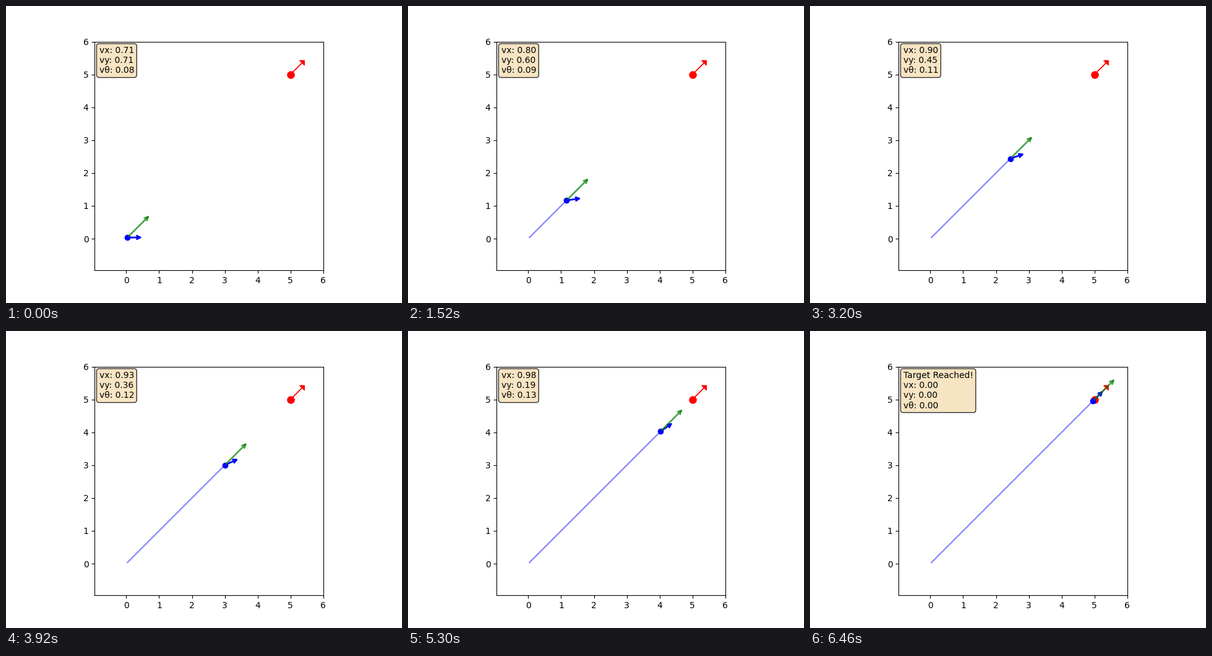
These frames come from a looping animation (640 px wide and 480 px high, 6.48 s). A matplotlib script:

```python
import numpy as np
import matplotlib.pyplot as plt
from matplotlib.animation import FuncAnimation

DT = 0.05
GOAL = np.array([5.0, 5.0])
GOAL_HEADING = np.pi / 4
TICK = 20        # ms
TICKS = 324


def simulate():
    """Drive sideways-capable robot to the goal while turning to its heading."""
    pos, heading = np.zeros(2), 0.0
    states = []
    while True:
        gap = GOAL - pos
        dist = np.hypot(*gap)
        bearing = np.arctan2(gap[1], gap[0]) - heading
        vx, vy = np.cos(bearing), np.sin(bearing)
        spin = (GOAL_HEADING - heading) * vx / dist
        pos = pos + gap / dist * DT
        heading += spin * DT
        done = np.hypot(*(GOAL - pos)) < 0.1
        if done:
            vx = vy = spin = 0.0
        label = f"vx: {vx:.2f}\nvy: {vy:.2f}\nvθ: {spin:.2f}"
        if done:
            label = "Target Reached!\n" + label
        states.append((pos, heading, label))
        if done:
            return states


states = simulate()
path = np.array([s[0] for s in states])

fig, ax = plt.subplots(figsize=(6.4, 4.8), dpi=100)
ax.set_aspect("equal")
ax.set_xlim(path[0, 0] - 1, GOAL[0] + 1)
ax.set_ylim(path[0, 1] - 1, GOAL[1] + 1)


def vector(angle, length):
    return length * np.array([np.cos(angle), np.sin(angle)])


def pointer(color, alpha=1):
    return ax.annotate("", xy=(0, 0), xytext=(0, 0),
                       arrowprops=dict(arrowstyle="->", color=color,
                                       lw=2, alpha=alpha))


def aim(arrow, start, angle, length):
    arrow.set_position(start)
    arrow.xy = start + vector(angle, length)


ax.plot(*GOAL, "ro", markersize=8)
ax.arrow(*GOAL, *vector(GOAL_HEADING, 0.5), head_width=0.2, head_length=0.1,
         fc="red", ec="red")
trail, = ax.plot([], [], "b-", alpha=0.5)
robot, = ax.plot([], [], "bo", markersize=6)
nose = pointer("blue")
course = pointer("green", 0.7)
info = ax.text(0.02, 0.98, "", transform=ax.transAxes, va="top",
               bbox=dict(boxstyle="round", facecolor="wheat", alpha=0.8))


def step_at(tick):
    # Steps last 20, 20 and 100 ms in turn.
    group, rest = divmod(tick + 1, 7)
    return min(3 * group + min(rest, 2) - 1, len(states) - 1)


def update(tick):
    i = step_at(tick)
    pos, heading, label = states[i]
    trail.set_data(path[:i + 1, 0], path[:i + 1, 1])
    robot.set_data(pos[:1], pos[1:])
    gap = GOAL - pos
    aim(nose, pos, heading, 0.5)
    aim(course, pos, np.arctan2(gap[1], gap[0]), 1)
    info.set_text(label)
    return trail, robot, nose, course, info


anim = FuncAnimation(fig, update, frames=TICKS, interval=TICK,
                     repeat=True, repeat_delay=0, blit=False)
plt.show()
```
